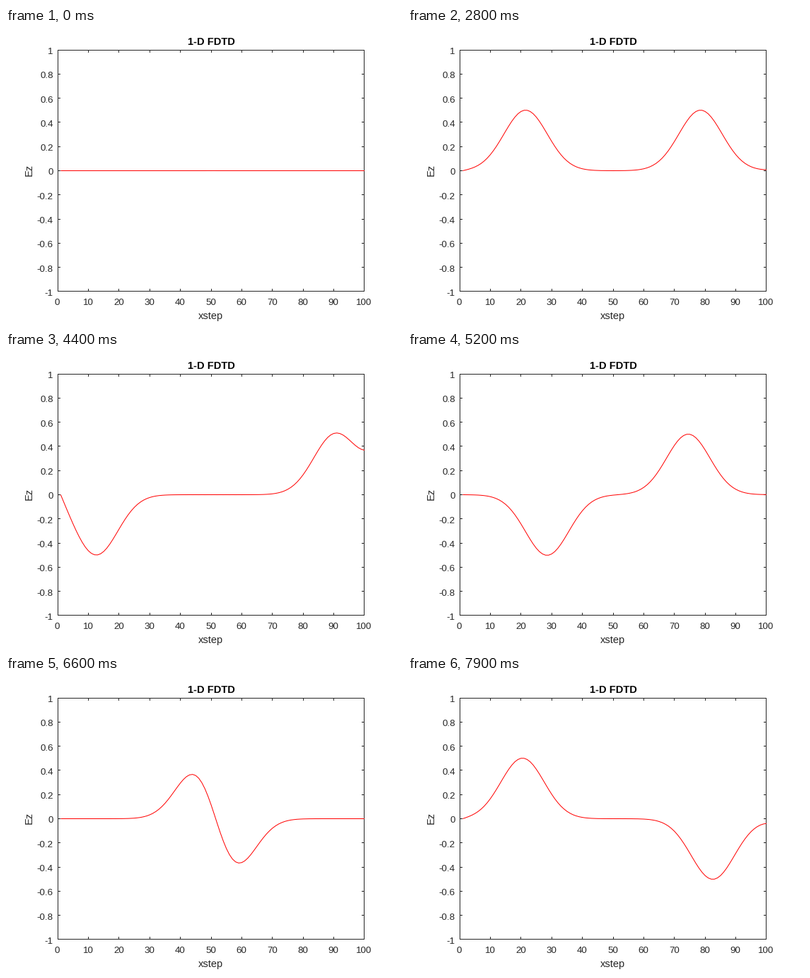
Recreate the animation shown at these times as a matplotlib script. Size 560x420 px, loop 8000 ms.

```python
import numpy as np
import matplotlib.pyplot as plt
from matplotlib.animation import FuncAnimation
from matplotlib.collections import LineCollection

W, H, DPI = 560, 420, 100
FRAMES, INTERVAL = 80, 100
CELLS, SOURCE = 100, 50
INK = (38 / 255,) * 3

# Pixel centres of the box lines
LEFT, RIGHT, TOP, BOTTOM = 73.5, 506.5, 31.5, 373.5
TICK = 3.5


def px(n):
    """Pixels to points."""
    return n * 72 / DPI


def to_x(x):
    return 73 + 4.34 * x


def to_y(v):
    return 202.5 - 171.5 * v


def mid(p, low, high):
    """Centre of the pixel that holds p, kept inside the box."""
    return np.clip(np.floor(p + 1e-6) + 0.5, low, high)


def simulate():
    """1-D Yee grid, fixed left end, open right end, two steps per frame."""
    ez, hy = np.zeros(CELLS), np.zeros(CELLS)
    shots = []
    for t in range(1, 2 * FRAMES + 1):
        hy[:-1] += ez[1:] - ez[:-1]
        ez[1:] += hy[1:] - hy[:-1]
        ez[SOURCE - 1] += np.exp(-(t - 30) ** 2 / 100)
        if t % 2 == 0:
            shots.append(ez.copy())
    return shots


fig = plt.figure(figsize=(W / DPI, H / DPI), dpi=DPI, facecolor="white")
ax = fig.add_axes([0, 0, 1, 1])
ax.set_xlim(0, W)
ax.set_ylim(H, 0)
ax.axis("off")


def label(x, y, text, size, **kw):
    style = dict(ha="center", va="baseline", color=INK, family="Liberation Sans")
    ax.text(x, y, text, fontsize=px(size), **{**style, **kw})


segments = [
    [(LEFT - 0.5, y), (RIGHT + 0.5, y)] for y in (TOP, BOTTOM)
] + [
    [(x, TOP), (x, BOTTOM)] for x in (LEFT, RIGHT)
]

for n in range(0, 101, 10):
    x = mid(to_x(n), LEFT, RIGHT)
    segments += [[(x, TOP), (x, TOP + TICK)], [(x, BOTTOM), (x, BOTTOM - TICK)]]
    label(to_x(n) - 0.5, 393, str(n), 13.33)

for k in range(-5, 6):
    y = mid(to_y(k / 5), TOP, BOTTOM)
    segments += [[(LEFT, y), (LEFT + TICK, y)], [(RIGHT, y), (RIGHT - TICK, y)]]
    label(66.8, to_y(k / 5) + 5.95, f"{k / 5:g}", 13.33, ha="right")

ax.add_collection(LineCollection(segments, colors=[INK], linewidths=px(1), snap=False))

label(290.5, 24, "1-D FDTD", 14.67, weight="bold", color="black")
label(289.5, 413, "xstep", 14.67)
label(37, 201, "Ez", 14.67, rotation=90, rotation_mode="anchor")

fields = simulate()
xs = to_x(np.arange(1, CELLS + 1))
wave, = ax.plot(xs, to_y(fields[0]), color="red", lw=px(1), snap=False,
                solid_capstyle="butt", zorder=3)


def draw(i):
    wave.set_ydata(to_y(fields[i]))
    return wave,


anim = FuncAnimation(fig, draw, frames=FRAMES, interval=INTERVAL, repeat=True,
                     repeat_delay=0)
plt.show()
```
